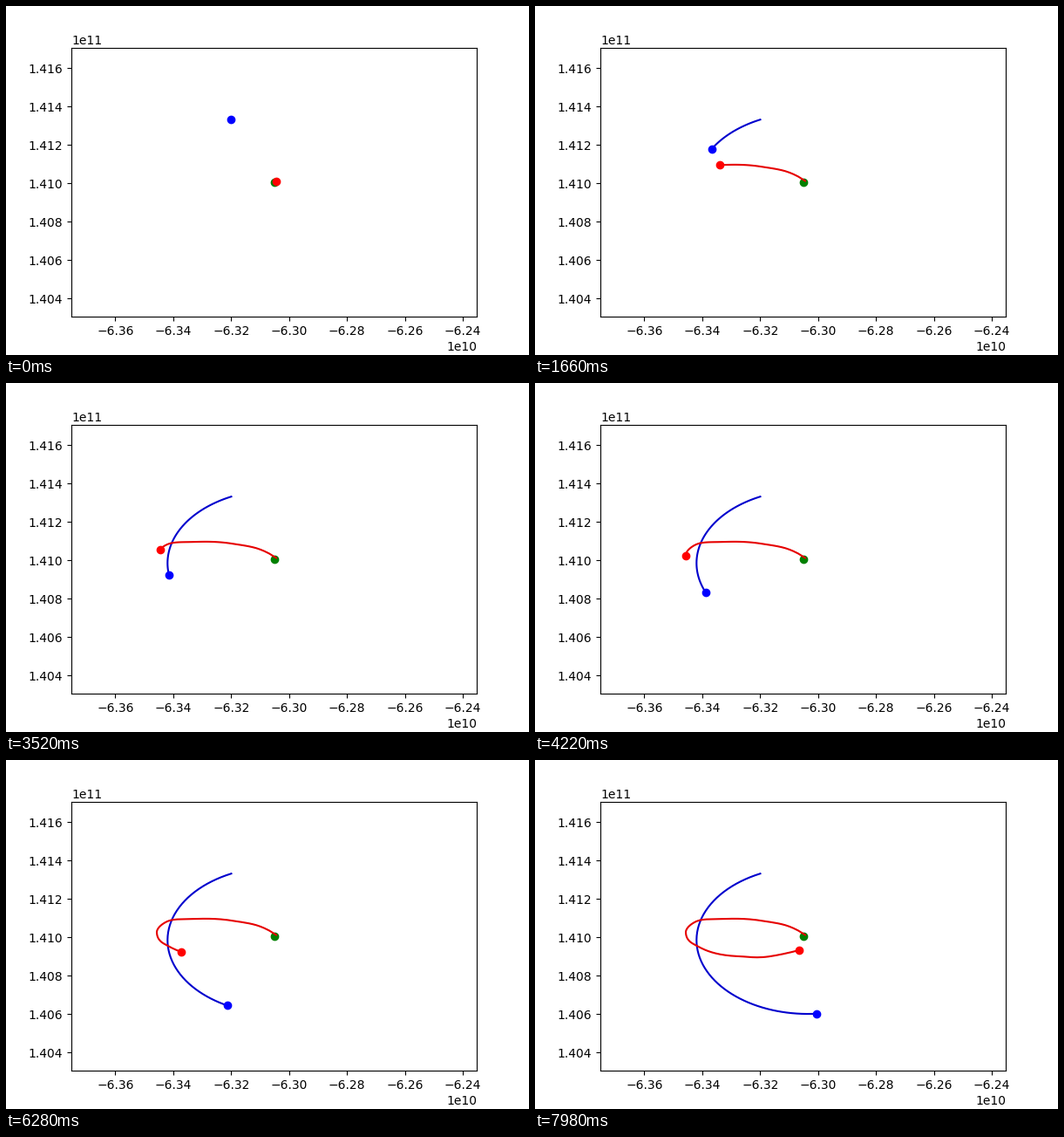
Recreate the animation shown at these times as a matplotlib script. Size 600 by 400 pixels, loop 8 s.

```python
import numpy as np
import matplotlib.pyplot as plt
from matplotlib.animation import FuncAnimation

TICK = 20          # ms per drawn frame
LOOP = 8000        # ms
STEPS = 172        # simulation steps in one loop
EARTH = np.array([-6.30518e10, 1.41006e11])
HALF = 7e8         # half width of the view, in metres
PX = np.array([2 * HALF / 465, -2 * HALF / 308])  # metres per pixel
CENTRE = np.array([307.5, 202.0])

# Lunar orbit: size, eccentricity, perigee direction, mean anomaly and its rate
AXIS, ECC = 3.838e8, 0.068
PERIGEE, ANOMALY, RATE = np.radians([126, -10.15, 0.918])

# Way points of the craft on the stage: step, x, y
WAY = np.array([
    (0, 310, 200.5), (3.4, 290, 190.2), (11, 260, 184.2), (35, 212, 182.2),
    (62, 185, 185), (91, 173, 198), (116, 182, 211), (151, 234, 225),
    (163.5, 270, 225), (171, 303, 218)])


def moon_path(n):
    """Kepler ellipse around the Earth."""
    mean = ANOMALY + RATE * n
    ecc = mean
    for _ in range(20):
        ecc = mean + ECC * np.sin(ecc)
    x = AXIS * (np.cos(ecc) - ECC)
    y = AXIS * np.sqrt(1 - ECC ** 2) * np.sin(ecc)
    c, s = np.cos(PERIGEE), np.sin(PERIGEE)
    return EARTH + np.column_stack([c * x - s * y, s * x + c * y])


def craft_path(n):
    """Cubic curve through the way points; distance from launch grows as t^(2/3)."""
    t, u = WAY[:, 0] ** (2 / 3), n ** (2 / 3)
    p = (WAY[:, 1:] - CENTRE) * PX
    slope = np.gradient(p, t, axis=0, edge_order=2)
    i = np.clip(np.searchsorted(t, u, side="right") - 1, 0, len(t) - 2)
    h = (t[i + 1] - t[i])[:, None]
    s = (u - t[i])[:, None] / h
    q = 1 - s
    return EARTH + (q * q * (1 + 2 * s) * p[i] + s * s * (3 - 2 * s) * p[i + 1]
                    + h * s * q * (q * slope[i] - s * slope[i + 1]))


def step_at(ms):
    """Three steps every 140 ms, lasting 20, 100 and 20 ms."""
    cycle, rest = divmod(ms, 140)
    return 3 * cycle + (rest >= 20) + (rest >= 120)


fig, ax = plt.subplots(figsize=(6, 4), dpi=100)
ax.set_xlim(EARTH[0] - HALF, EARTH[0] + HALF)
ax.set_ylim(EARTH[1] - HALF, EARTH[1] + HALF)
ax.plot(*EARTH, "o", color="green")

steps = np.arange(STEPS)
bodies = []
for path, color, line in ((moon_path(steps), "blue", "mediumblue"),
                          (craft_path(steps), "red", "#e60000")):
    trail, = ax.plot([], [], color=line)
    dot, = ax.plot([], [], "o", color=color, zorder=3)
    bodies.append((path, trail, dot))


def draw(frame):
    n = step_at(frame * TICK)
    for path, trail, dot in bodies:
        trail.set_data(*path[:n + 1].T)
        dot.set_data(*path[n:n + 1].T)
    return [artist for body in bodies for artist in body[1:]]


anim = FuncAnimation(fig, draw, frames=LOOP // TICK, interval=TICK,
                     repeat=True, repeat_delay=0)
plt.show()
```
